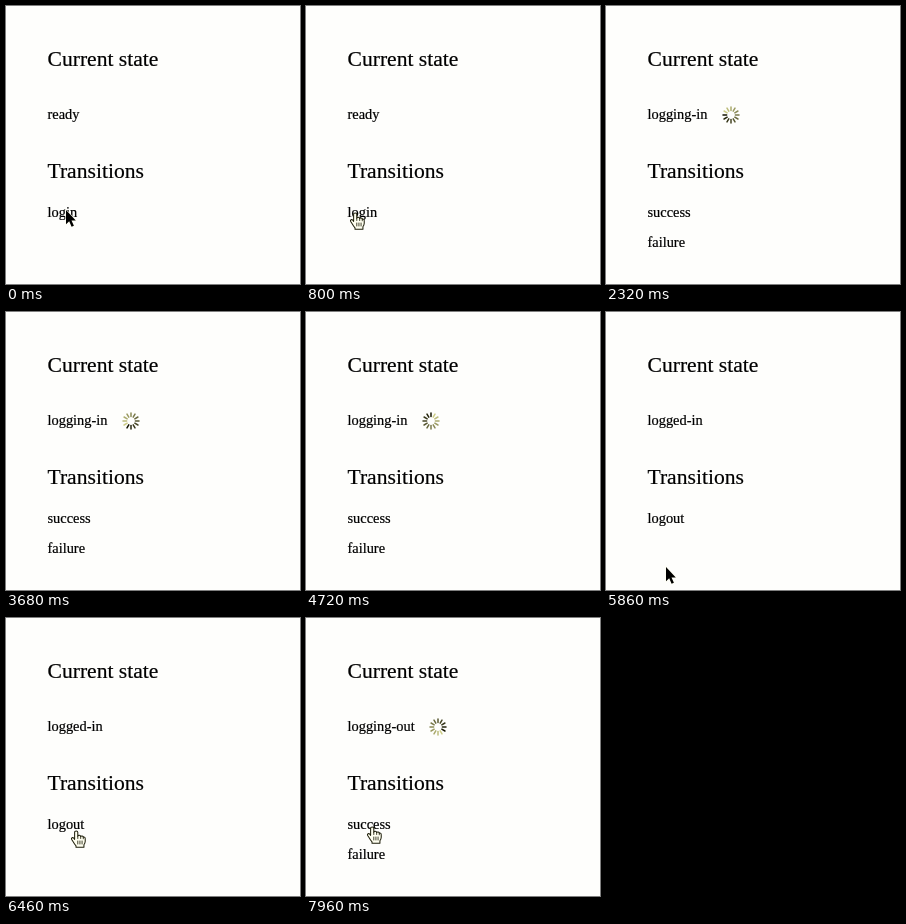
An HTML page for the animation above (8 s loop, 294 by 278 pixels).

```html
<!DOCTYPE html>
<html lang="en">
<head>
<meta charset="utf-8">
<title>State machine</title>
<style>
html, body { margin: 0; width: 100%; height: 100%; overflow: hidden; background: #fefefc; }
svg { display: block; width: 294px; height: 278px; }
text { font: 14.4px "Liberation Serif", Times, serif; fill: #000; stroke: #000; stroke-width: .2px; }
.head { font-size: 21.6px; }
</style>
</head>
<body>
<svg viewBox="0 0 294 278" xmlns="http://www.w3.org/2000/svg">
  <text class="head" x="41.5" y="60">Current state</text>
  <text id="state" x="41.5" y="113"></text>
  <text class="head" x="41.5" y="172">Transitions</text>
  <text id="link0" x="41.5" y="211"></text>
  <text id="link1" x="41.5" y="241"></text>
  <g id="spinner"></g>
  <g id="cursor">
    <path id="arrow" d="M0 0V14.2L3.2 11.2L5.6 16.8L7.9 15.8L5.5 10.4H9.8Z" fill="#000" stroke="#fffff0" stroke-width="1.2" paint-order="stroke"/>
    <g id="hand" transform="translate(-.7 .6) scale(.93)" stroke="#1c1c08" stroke-width="1.1" stroke-linejoin="round" stroke-linecap="round">
      <path fill="#fffff0" d="M-1.8 8.6V1.8Q-1.8 .4 -.1 .4Q1.6 .4 1.6 1.8V6Q2 5 3.2 5.1Q4.5 5.2 4.7 6.3Q5.3 5.6 6.3 5.8Q7.4 6 7.5 7.1Q8 6.7 8.8 7Q9.7 7.4 9.6 8.7V11.5Q9.5 13.5 8.2 15.2V17.8H-.3V16.4Q-2 14.5 -3.2 12.3L-5 9.6Q-5.6 8.2 -4.6 7.7Q-3.5 7.2 -2.6 8.2L-1.8 9.4Z"/>
      <path fill="none" stroke-width=".9" d="M1.6 6V8.5M4.7 6.3V8.5M7.5 7.1V8.8M1.6 11.2V14.4M3.9 11.2V14.4M6.2 11.2V14.4"/>
    </g>
  </g>
</svg>
<script>
const LOOP = 8000;
const $ = id => document.getElementById(id);

const states = [
  { at: 0, name: "ready", links: ["login"] },
  { at: 1360, name: "logging-in", links: ["success", "failure"], spin: 125 },
  { at: 5000, name: "logged-in", links: ["logout"] },
  { at: 7640, name: "logging-out", links: ["success", "failure"], spin: 132 }
];
const widths = { login: 30, success: 44, failure: 38, logout: 38 };

// Pointer moves: start, end, from x, y, to x, y
const moves = [
  [300, 520, 60, 204, 42, 211],
  [660, 800, 42, 211, 50, 206],
  [1700, 2040, 50, 206, 62, 284],
  [5840, 6080, 60, 256, 59, 193],
  [6240, 6460, 59, 193, 71, 212],
  [6660, 6840, 71, 212, 67, 208]
];

const spokes = Array.from({ length: 12 }, (_, i) => {
  const line = document.createElementNS("http://www.w3.org/2000/svg", "path");
  line.setAttribute("d", "M0 -4.4V-8");
  line.setAttribute("transform", `rotate(${i * 30})`);
  line.setAttribute("stroke-width", 1.5);
  line.setAttribute("stroke-linecap", "round");
  return $("spinner").appendChild(line);
});

const ease = p => p * p * (3 - 2 * p);
const show = (el, on) => el.setAttribute("visibility", on ? "visible" : "hidden");
const place = (el, x, y) => el.setAttribute("transform", `translate(${x} ${y})`);

function pointer(t) {
  const [start, end, x0, y0, x1, y1] = moves.filter(m => m[0] <= t).pop() || moves[0];
  const p = ease(Math.min(1, Math.max(0, (t - start) / (end - start))));
  return [Math.round(x0 + (x1 - x0) * p), Math.round(y0 + (y1 - y0) * p)];
}

function overLink(x, y, links) {
  return links.some((name, i) => {
    const top = 198 + 30 * i;
    return x >= 41 && x <= 41 + widths[name] && y >= top && y <= top + 17;
  });
}

// The spinner ticks slowly at first, then twice as fast.
function ticks(age) {
  return Math.floor(age < 960 ? age / 130 : 7 + (age - 960) / 61);
}

function drawSpinner(x, age) {
  place($("spinner"), x, 109);
  const lead = ticks(age) + 2;
  spokes.forEach((line, i) => {
    const fade = ((lead - i) % 12 + 12) % 12 / 11;
    const tone = (dark, light) => Math.round(dark + (light - dark) * fade);
    const warm = tone(20, 205);
    line.setAttribute("stroke", `rgb(${warm},${warm},${tone(0, 135)})`);
  });
}

function draw(time) {
  const t = Math.floor(time % LOOP / 20) * 20;
  const state = states.filter(s => s.at <= t).pop();
  $("state").textContent = state.name;
  [0, 1].forEach(i => { $("link" + i).textContent = state.links[i] || ""; });

  show($("spinner"), state.spin);
  if (state.spin) drawSpinner(state.spin, t - state.at);

  const [x, y] = pointer(t);
  const visible = t < 2060 || t >= 5860;
  const hand = t >= 300 && overLink(x, y, state.links);
  place($("cursor"), x, y);
  show($("arrow"), visible && !hand);
  show($("hand"), visible && hand);
}

const begin = performance.now();
function tick() {
  draw(performance.now() - begin);
  requestAnimationFrame(tick);
}
tick();
</script>
</body>
</html>
```
